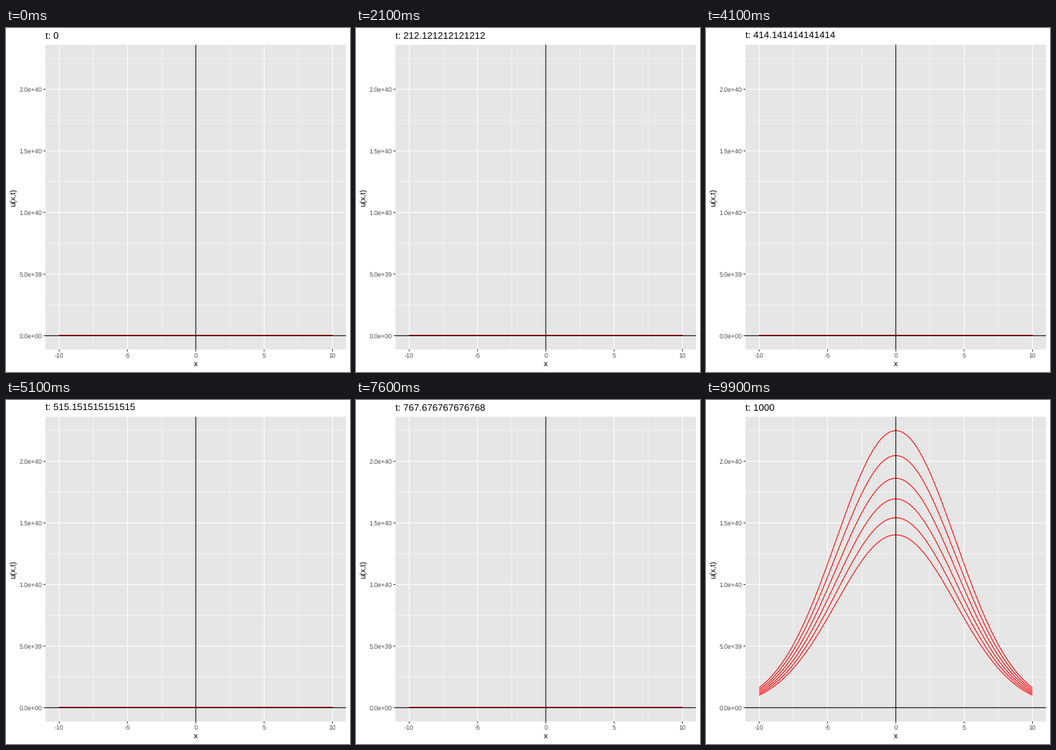
A matplotlib script that plays this animation: 480x480 px, repeating every 10000 ms.

```python
import matplotlib.pyplot as plt
import numpy as np
from matplotlib.animation import FuncAnimation
from matplotlib.patches import Rectangle

SIZE, DPI, FRAMES = 480, 100, 100
LEFT, RIGHT, TOP, BOTTOM = 55.1, 474.5, 23.4, 448.6
T_END, GROWTH, PEAK, SPREAD = 1000, 1.099, 2.249, 38.0

plt.rcParams.update({
    "font.family": "Liberation Sans",
    "text.hinting": "none",
    "text.kerning_factor": 10,  # effectively no kerning
    "path.snap": False,
    "lines.solid_capstyle": "butt",
})

fig = plt.figure(figsize=(SIZE / DPI, SIZE / DPI), dpi=DPI, facecolor="white")
ax = fig.add_axes([0, 0, 1, 1])
ax.set(xlim=(0, SIZE), ylim=(SIZE, 0))
ax.axis("off")


def px(x):
    return 264.85 + 19.065 * x


def py(u):
    """Pixel row of a value given in units of 1e40."""
    return 429.3 - 171.9 * u


def pt(pixels):
    return pixels * 72 / DPI


def stroke(xs, ys, color, width, z):
    return ax.plot(xs, ys, color=color, lw=pt(width), zorder=z)[0]


def label(x, y, text, size, color="black", **kw):
    return ax.text(x, y, text, fontsize=pt(size), color=color,
                   va="baseline", **kw)


def vertical(x, color, width, z):
    stroke([px(x)] * 2, [TOP, BOTTOM], color, width, z)


def horizontal(u, color, width, z):
    stroke([LEFT, RIGHT], [py(u)] * 2, color, width, z)


ax.add_patch(Rectangle((LEFT, TOP), RIGHT - LEFT, BOTTOM - TOP,
                       facecolor="#e6e6e6", lw=0, zorder=0))

for x in (-7.5, -2.5, 2.5, 7.5):
    vertical(x, "white", 0.53, 1)
for u in np.arange(0.25, 2.5, 0.5):
    horizontal(u, "white", 0.53, 1)

for x in (-10, -5, 0, 5, 10):
    vertical(x, "white", 1.07, 2)
    stroke([px(x)] * 2, [BOTTOM, BOTTOM + 2.74], "#333333", 1.07, 2)
    label(px(x), 460, str(x), 8.8, "#4d4d4d", ha="center")
for u in (0, 0.5, 1, 1.5, 2):
    horizontal(u, "white", 1.07, 2)
    stroke([LEFT - 2.74, LEFT], [py(u)] * 2, "#333333", 1.07, 2)
    label(50.2, py(u) + 3.2, f"{u * 1e40:.1e}", 8.8, "#4d4d4d", ha="right")

horizontal(0, "black", 1.07, 5)
vertical(0, "black", 1.07, 5)

label((LEFT + RIGHT) / 2, 472.5, "x", 11, ha="center")
label(14, (TOP + BOTTOM) / 2, "u(x,t)", 11, ha="center",
      rotation=90, rotation_mode="anchor")
title = label(LEFT, 15, "", 13.2, ha="left")

xs = np.linspace(-10, 10, 201)
bell = PEAK * np.exp(-xs**2 / SPREAD)
curves = [stroke([], [], "red", 1.07, 4) for _ in range(11)]

# Each frame shows every whole time step that rounds to it.
steps = [[] for _ in range(FRAMES)]
for t in range(T_END + 1):
    steps[round(t * (FRAMES - 1) / T_END)].append(t)


def update(i):
    title.set_text(f"t: {i * T_END / (FRAMES - 1):.15g}")
    for k, curve in enumerate(curves):
        if k < len(steps[i]):
            scale = GROWTH ** (steps[i][k] - T_END)
            curve.set_data(px(xs), py(bell * scale))
        else:
            curve.set_data([], [])
    return [title, *curves]


anim = FuncAnimation(fig, update, frames=FRAMES, interval=100,
                     repeat=True, repeat_delay=0, blit=False)
plt.show()
```
